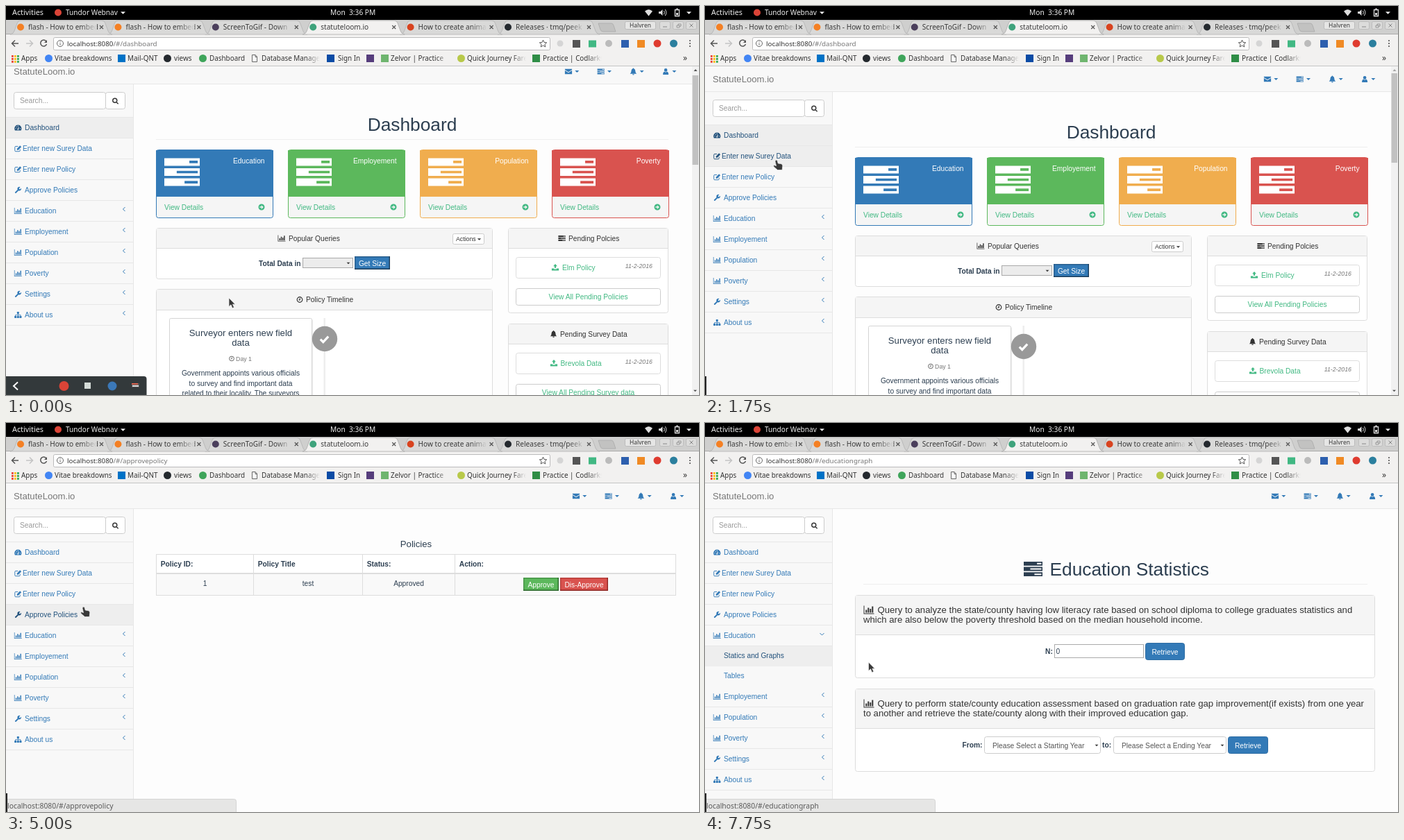
Recreate the animation shown at these times as an HTML page. Size 998 by 561 pixels, loop 8000 ms.

```html
<!DOCTYPE html>
<html lang="en">
<head>
<meta charset="utf-8">
<title>Dashboard walkthrough</title>
<style>
html, body { margin: 0; width: 100%; height: 100%; overflow: hidden; background: #fdfdfd; }
svg { display: block; width: 100%; height: 100%; font-family: "Liberation Sans", Arial, sans-serif; }
.ui { font-family: "Noto Sans", "Open Sans", sans-serif; }
</style>
</head>
<body>
<svg id="stage" viewBox="0 0 998 561"></svg>
<script>
const INK = '#2c3e50', BLUE = '#337ab7', GREEN = '#42b983', LINE = '#ddd', SIZE = 10.22, HEAD = 13.15, SMALL = 8.77;
const BOLD = 'font-weight="bold"', UI = 'class="ui"';

// Icons on a 14 x 14 grid: filled outline, optional stroked part and its width
const icons = {
  gauge: ['M0 8.500a7 7 0 0 1 14 0q0 2-1 4H1q-1-2-1-4zM6 9.500a1.200 1.200 0 1 0 2 0L9 5.500H8zM2 8h1.500v1.500H2zM3.500 4.500H5V6H3.500zM6.300 3h1.400v1.500H6.300zM10.500 8H12v1.500h-1.500z'],
  edit: ['M5 10V7.300L11 1.200l2.600 2.600L7.500 10z', 'M11 8.500v2.700a1.600 1.600 0 0 1-1.600 1.600H2.400a1.600 1.600 0 0 1-1.600-1.600V4.400a1.600 1.600 0 0 1 1.600-1.600H7', 1.3],
  wrench: ['M.8 11.300L6 6.200A4 4 0 0 1 11.500 1L9.300 3.200v1.600l1.700.6 2.400-2A4 4 0 0 1 8 8.100L2.900 13.200q-1.400.5-2.100-1.900z'],
  chart: ['M-.5 1h1v11h14v1h-15zM2.300 7h2v4h-2zM5.300 4h2v7h-2zM8.300 5.500h2V11h-2zM11.300 2h2v9h-2z'],
  sitemap: ['M5 1h4v4H7.600v1.500h4.900V9H14v4h-4V9h1.300V7.700H7.600V9H9v4H5V9h1.400V7.700H2.700V9H4v4H0V9h1.500V6.500h4.900V5H5z'],
  mail: ['M0 2h14v1.500L7 8 0 3.500zM0 5l7 4.500L14 5v7H0z'],
  tasks: ['M0 1.500h14v3H0zM0 5.500h14v3H0zM0 9.500h14v3H0zM9.900 2.500h3.300v1H9.900zM4.900 6.500h8.300v1H4.900zM8 10.500h5.200v1H8z'],
  bell: ['M7 0q1 0 1 1.200Q11 2 11 6q0 4 2.500 5.500H.5Q3 10 3 6q0-4 3-4.800Q6 0 7 0zM5.200 12h3.600a1.800 1.800 0 0 1-3.600 0z'],
  user: ['M7 1a3.200 3.200 0 0 1 0 6.400A3.200 3.200 0 0 1 7 1zM1.500 13q0-5.500 3-5.800 2.500 2 5 0 3 .3 3 5.800z'],
  clock: ['', 'M7 1.800a5.200 5.200 0 1 1 0 10.400A5.200 5.200 0 1 1 7 1.800zM7.300 4v3.500H5', 1.6],
  check: ['', 'M2 7.500l3.500 3.500L12 4', 2.8],
  card: ['M0 4.500h14V7H0zM2 9.500h2v1H2zM5 9.500h3v1H5z', 'M.6 2h12.800v10H.6z', 1.1],
  upload: ['M7 0l4 4.500H8.500V8h-3V4.500H3zM0 9h4.500v1.500h5V9H14v4H0z'],
  go: ['M7 1a6 6 0 1 1 0 12A6 6 0 1 1 7 1zM3.500 6v2h4L6 9.500l1 1L10.700 7 7 3.500l-1 1L7.500 6z'],
  search: ['', 'M6 1.800a4 4 0 1 1 0 8.400a4 4 0 1 1 0-8.400zM9.300 9.300l3.500 3.500', 2],
};

const path = (d, fill = 'none', stroke = 'none', w = 1, extra = '') =>
  `<path d="${d}" fill="${fill}" stroke="${stroke}" stroke-width="${w}" ${extra}/>`;
function rect(x0, y0, x1, y1, fill, stroke, r = 0) {
  const i = stroke ? .5 : 0;
  return `<rect x="${x0 + i}" y="${y0 + i}" width="${x1 - x0 - 2 * i}" height="${y1 - y0 - 2 * i}" rx="${r}" fill="${fill}" stroke="${stroke || 'none'}"/>`;
}
const text = (x, y, s, size = SIZE, fill = INK, anchor = 'start', extra = '') =>
  `<text x="${x}" y="${y}" font-size="${size}" fill="${fill}" text-anchor="${anchor}" ${extra}>${s}</text>`;
const mid = (x, y, s, size, fill, extra) => text(x, y, s, size, fill, 'middle', extra);
const lines = (x, y, step, rows, size) => rows.map((s, i) => mid(x, y + i * step, s, size)).join('');
const ui = (x, y, s, size = 9.9, fill = '#333') => text(x, y, s, size, fill, 'start', UI);
const dot = (x, y, r, fill) => `<circle cx="${x}" cy="${y}" r="${r}" fill="${fill}"/>`;
const caret = (x, y, w = 3, fill = BLUE) => path(`M${x - w} ${y - w / 2}h${2 * w}l${-w} ${w}z`, fill);
const fade = (x0, y0, x1, y1, shade) => rect(x0, y0, x1, y1, `url(#${shade})`);
const rule = (x0, x1, y, color = '#eee') => rect(x0, y, x1, y + 1, color);
function icon(name, x, y, size = SIZE, color = BLUE) {
  const [solid, stroke, w] = icons[name];
  return `<g transform="translate(${x - size / 2} ${y - size / 2}) scale(${size / 14})">` +
    path(solid, color, 'none', 1, 'fill-rule="evenodd"') + (stroke ? path(stroke, 'none', color, w) : '') + '</g>';
}
const panel = (x0, y0, x1, y1, head) => rect(x0, y0, x1, y1, '#fff', LINE, 3) +
  rect(x0 + 1, y0 + 1, x1 - 1, head, '#f5f5f5') + rule(x0, x1, head - 1, LINE);
const field = (x0, y0, x1, y1, value = '') => rect(x0, y0, x1, y1, '#fff', '#ccc', 3) + text(x0 + 9, y1 - 8, value, SIZE, '#555');
const button = (x0, y0, x1, y1, s, fill = BLUE, edge = '#2e6da4') =>
  rect(x0, y0, x1, y1, fill, edge, 3) + mid((x0 + x1) / 2, y1 - 8.500, s, SIZE, '#fff');
const bevel = (x0, y0, x1, y1, s, fill, dark) => rect(x0, y0, x1, y1, fill) +
  path(`M${x0 + .7} ${y1}V${y0 + .7}H${x1}`, 'none', dark, 1.4, 'opacity=".45"') +
  path(`M${x0} ${y1 - .7}H${x1 - .7}V${y0}`, 'none', dark, 1.4) + mid((x0 + x1) / 2, y1 - 5.300, s, SIZE, '#fff');
const title = (x, y, s) => mid(x, y, s, 26.3);

const tabs = [['flash - How to embed', '#f48024'], ['flash - How to embed', '#f48024'], ['ScreenToGif - Down', '#4b3f5c'],
  ['statuteloom.io', '#3fa37c'], ['How to create anima', '#d8431f'], ['Releases · tmq/peek', '#24292e']];
const bookmarks = [[56, 70, 'Vitae breakdowns', '#4285f4'], [161, 175, 'Mail-QNT', '#0072c6', 1], [227, 242, 'views', '#24292e'],
  [278, 293, 'Dashboard', '#3fa55b'], [353, 368, 'Database Manage', '', 0, 452], [462, 478, 'Sign In', '#0a4ba5', 1], [519, 535, '', '#563d7c', 1],
  [540, 554, 'Zelvor | Practice', '#6fb56f', 1, 639], [650, 664, 'Quick Journey Fares', '#b8c94a', 0, 749],
  [758, 773, 'Practice | Codlarks', '#2f8d46', 1, 858]];

function tab(i) {
  const x = 6 + 140.4 * i, on = i === 3, [label, color] = tabs[i];
  return path(`M${x} 41q5-1 6-5l4-11q1-4 5-4h117q4 0 5 4l4 11q1 4 6 5z`, on ? '#f2f1f0' : '#d9d9d8', on ? '#aaa' : '#b3b3b3', .8) +
    dot(x + 15, 30.5, 5, color) + ui(x + 26, 34, label, 10.1, '#3a3a3a') +
    fade(x + 102, 24, x + 125, 38, on ? 'fadeOn' : 'fadeOff') + path(`M${x + 129} 28l5 5m0-5l-5 5`, 'none', '#555', 1.2);
}

function browser(url) {
  const cut = url.indexOf('/');
  let out = rect(0, 0, 998, 20, '#000') + text(9, 13, 'Activities', 10.8, '#eee', 'start', UI) + dot(75, 9.500, 5, '#db4437') +
    ui(86, 13, 'Tundor Webnav', 10.1, '#eee') + caret(168.500, 10, 3.500, '#eee') + ui(467, 13, 'Mon\u00a0\u00a03:36 PM', 10.2, '#eee') +
    path('M920 7.500q5.500-5 11 0l-5.500 7z', '#ddd') +
    path('M940 8h2.500l3-3v9l-3-3H940z', '#ddd') + path('M947.500 7q2 2.500 0 5m1.700-7q3.500 4.500 0 9', 'none', '#ddd') +
    path('M963.500 5.500h6v9h-6zM965.500 4h2', 'none', '#ddd', 1.3) + rect(965, 10, 968, 13, '#ddd') + caret(983.500, 10, 3.500, '#eee');
  out += rect(0, 20, 998, 41, '#cfcfce') + rect(0, 41, 998, 87, '#f2f1f0') + rule(0, 998, 40, '#aaa');
  for (const i of [5, 4, 2, 1, 0, 3]) out += tab(i);
  out += path('M853 25h19q2 0 3 3l3 9h-18q-3 0-4-3z', '#c2c2c1', '#aaa', .8) +
    rect(891, 22, 936, 34, '#e6e6e5', '#bbb', 2) + mid(913.500, 31, 'Halvren', 8.5, '#333', UI);
  for (const x of [941, 960, 979]) out += rect(x, 22, x + 16, 34, '#dcdcdb', '#bdbdbd', 2);
  out += path('M946 30h6', 'none', '#888') + path('M966 28h4v3h-4zM968 28v-2h4v3h-2', 'none', '#888', .8) + path('M984.500 25.500l5 5m0-5l-5 5', 'none', '#888');
  out += path('M18 54H9m4-4.500L8.500 54l4.500 4.500', 'none', '#555', 1.5) + path('M29 54h9m-4-4.500l4.500 4.500-4.500 4.500', 'none', '#c4c4c4', 1.5) +
    path('M58 51a4.500 4.500 0 1 0 .5 4', 'none', '#555', 1.5) + path('M59 49v4h-4z', '#555') + rect(68, 45, 784, 64, '#fff', '#bbb', 2) +
    path('M78 49.500a4.500 4.500 0 1 1 0 9a4.500 4.500 0 1 1 0-9M78 53.500v3M78 51v1.200', 'none', '#666') +
    ui(88, 58, `${url.slice(0, cut)}<tspan fill="#777">${url.slice(cut)}</tspan>`, 9.8) +
    path('M773.500 49l1.500 3.500 3.700.3-2.800 2.500.9 3.700-3.300-2-3.300 2 .9-3.700-2.800-2.500 3.700-.3z', 'none', '#555');
  out += dot(798, 54, 4.500, '#d5d5d5') + rect(816, 49, 827, 60, '#555') + rect(839, 49.500, 850, 59.500, '#41b883') + dot(868, 54, 5, '#bbb') +
    rect(886, 49, 897, 60, '#2d5fae') + rect(909, 49, 920, 60, '#f08a24') + dot(938, 54, 5.500, '#df3b2f') + dot(961.500, 54, 5.500, '#2b7f9e');
  for (const y of [50, 54, 58]) out += dot(985, y, 1.1, '#555');
  const hues = ['#ea4335', '#fbbc05', '#34a853', '#4285f4'];
  for (let i = 0; i < 9; i++) {
    const x = 8 + i % 3 * 4, row = i / 3 | 0, y = 71 + row * 4;
    out += rect(x, y, x + 2.8, y + 2.8, hues[(i + row) % 4]);
  }
  out += ui(22, 79, 'Apps');
  for (const [ix, x, label, color, square, end] of bookmarks) {
    out += !color ? path(`M${ix + 1.500} 70.500h4.500l2.500 2.500v7.500h-7zM${ix + 6} 70.500v3h2.500`, '#fff', '#666')
      : square ? rect(ix, 70, ix + 11, 81, color) : dot(ix + 5.500, 75.500, 5.500, color);
    out += ui(x, 79, label) + (end ? fade(end - 20, 68, end, 84, 'fadeOn') + rect(end, 68, end + 10, 84, '#f2f1f0') : '');
  }
  return out + ui(975, 79, '»', 12) + rule(0, 998, 86, '#c4c4c4');
}

const menu = [['gauge', 'Dashboard'], ['edit', 'Enter new Surey Data'], ['edit', 'Enter new Policy'], ['wrench', 'Approve Policies'],
  ['chart', 'Education'], ['chart', 'Employement'], ['chart', 'Population'], ['chart', 'Poverty'], ['wrench', 'Settings'], ['sitemap', 'About us']];

function sidebar({ hot, open }) {
  const tone = i => hot.includes(i) ? '#23527c' : BLUE, back = i => hot.includes(i) ? '#eee' : '#f8f8f8';
  let out = rect(0, 124, 183, 1800, '#f8f8f8') + rect(183, 124, 184, 1800, '#e7e7e7') +
    rect(11, 135, 144, 160, '#fff', '#ccc', 3) + rect(143, 135, 172, 160, '#fff', '#ccc', 3) +
    text(20, 151, 'Search...', SIZE, '#999') + icon('search', 157.500, 148, 10, '#333') + rule(0, 183, 171, '#e7e7e7');
  menu.forEach(([name, label], i) => {
    const y = 172 + 30 * i + (i > 4 ? open : 0);
    out += rect(0, y, 183, y + 29, back(i)) + rule(0, 183, y + 29, '#e7e7e7') +
      icon(name, 17.300, y + 14.500, SIZE, tone(i)) + text(name === 'edit' ? 24 : 27, y + 18, label, SIZE, tone(i));
    if (i > 3) out += path(i === 4 && open ? `M165.500 ${y + 11}l3 3 3-3` : `M171.500 ${y + 9}l-3 3 3 3`, 'none', tone(i));
    if (i === 4 && open) ['Statics and Graphs', 'Tables'].forEach((s, k) => {
      const sy = y + 30 + 29 * k;
      out += rect(0, sy, 183, sy + 29, back(10 + k)) + text(27, sy + 17, s, SIZE, tone(10 + k));
    });
  });
  return out;
}

function navbar(dx) {
  let out = rect(0, 87, 998, 124, '#f8f8f8') + rule(0, 998, 123, '#e7e7e7') + text(11, 109.500, 'StatuteLoom.io', HEAD, '#777');
  ['mail', 'tasks', 'bell', 'user'].forEach((name, i) => {
    const x = 810 + dx + 46.700 * i;
    out += icon(name, x, 105.500) + caret(x + 12.300, 105.500);
  });
  return out;
}

function timelineCard(x0, y0, y1, badge, color, heads, day, paras) {
  const cx = x0 + 103;
  let out = rect(x0 + 1, y0 + 2, x0 + 207, y1 + 2, '#eee', '', 2) + rect(x0, y0, x0 + 206, y1, '#fff', '#d4d4d4', 2) +
    dot(459, y0 + 30, 18.200, color) + icon(badge, 458.500, y0 + 30, 16, '#fff') + lines(cx, y0 + 26, 14.200, heads, HEAD) +
    icon('clock', cx - (day.length > 5 ? 16.500 : 13), y0 + 58.500, 9, '#777') + mid(cx + 4.500, y0 + 61.700, day, SMALL, '#777');
  let y = y0 + 82.9;
  for (const p of paras) {
    out += lines(cx, y, 14.600, p);
    y += p.length * 14.600 + 4;
  }
  return out;
}

function pending(y, name, head, hx, item, all) {
  return panel(723, y, 954, y + 123, y + 30) + icon(name, hx - 9.500, y + 15, SIZE, '#333') + text(hx, y + 19, head, SIZE, '#333') +
    rect(734, y + 42, 943, y + 73, '#fff', LINE, 3) + icon('upload', 791 - (hx < 800 ? 2 : 0), y + 57, SIZE, GREEN) +
    text(hx < 800 ? 798.500 : 801, y + 60.700, item, SIZE, GREEN) + text(931, y + 58, '11-2-2016', SMALL, '#777', 'end', 'font-style="italic"') +
    rect(734, y + 87, 943, y + 112, '#fff', '#ccc', 3) + mid(838.500, y + 103, all, SIZE, GREEN);
}

function dashboard() {
  let out = title(585, 191, 'Dashboard') + rule(216, 954, 203);
  [['Education', BLUE], ['Employement', '#5cb85c'], ['Population', '#f0ad4e'], ['Poverty', '#d9534f']].forEach(([s, color], i) => {
    const x = 216 + 190 * i;
    out += rect(x, 218, x + 169, 317, '#f5f5f5', color, 3) + rect(x, 219, x + 169, 286, color) + icon('tasks', x + 37.500, 250.500, 51, '#fff') +
      text(x + 156.500, 237.500, s, SIZE, '#fff', 'end') + text(x + 12, 304.700, 'View Details', SIZE, GREEN) + icon('go', x + 152, 301, 10.5, GREEN);
  });
  out += panel(216, 331, 701, 405, 361) + icon('chart', 397, 346, SIZE, '#333') + text(407, 350, 'Popular Queries', SIZE, '#333') +
    rect(643, 339, 689, 355, '#fff', '#ccc', 2) + text(648, 350, 'Actions', SMALL, '#333') + caret(681.500, 347.500, 2.7, '#333') +
    text(364, 385.700, 'Total Data in', SIZE, INK, 'start', BOLD) + rect(427, 374, 500, 389, '#ececec', '#a9a9a9') + caret(493, 382, 2.4, '#333') +
    bevel(502, 372, 553, 391, 'Get Size', BLUE, '#1d3d5a');
  out += panel(216, 419, 701, 1500, 450) + icon('clock', 423, 434.5, SIZE, '#333') + text(432, 438.2, 'Policy Timeline', SIZE, '#333') +
    rect(457.500, 461, 460, 1480, '#eee');
  out += timelineCard(235, 461, 636, 'check', '#999', ['Surveyor enters new field', 'data'], 'Day 1',
    [['Government appoints various officials', 'to survey and find important data', 'related to their locality. The surveyors',
      'enter this collected data after', 'verification of authentication from a', 'superior authority into the system.']]);
  out += timelineCard(476, 640, 840, 'card', '#f0ad4e', ['Government Supervisor', 'approves the data'], 'Day 5-7',
    [['There is hierarchial structure of', 'supervisors who have specific domain', 'knowledge.'],
      ['They check the authenticity of the', 'entered data for various', 'parameters and approve it.']]);
  return out + pending(331, 'tasks', 'Pending Polcies', 810, 'Elm Policy', 'View All Pending Policies') +
    pending(469, 'bell', 'Pending Survey Data', 798, 'Brevola Data', 'View All Pending Survey data');
}

function formTop(cx, right, heading, bottom) {
  const label = (x, s) => mid(x, 325, s, SIZE, INK, BOLD);
  return title(cx, 220, heading) + rule(216, right, 232) + panel(216, 248, right, bottom, 264) +
    button(cx - 5.500, 275, cx + 45.500, 300, 'County') + button(cx - 48, 275, cx - 5, 300, 'State', '#286090', '#204d74') +
    label((228 + cx) / 2, 'State:') + label((cx + right - 12) / 2, 'County:') +
    field(239, 332, cx - 10.500, 357) + field(cx + 11, 332, right - 22, 357);
}

function survey() {
  return formTop(590.5, 965, 'New Survey Data', 450) + mid(590.5, 379, 'Select a CSV File to upload', SIZE, INK, BOLD) +
    rect(228, 386, 295, 403, '#e6e6e6', '#a5a5a5', 1) + text(234, 398.300, 'Choose File', SIZE, '#000') + text(297.500, 398.300, 'No file chosen') +
    button(565, 402, 616, 427, 'Submit');
}

function policy() {
  let out = formTop(585, 954, 'New Policy Submission Form', 1000);
  [['Domain *', ''], ['Policy Duration (Approx Duration in Months) *', '0'], ['Policy Budget(in $) *', '0'], ['Policy Name: *', '']].forEach(([s, value], i) => {
    const y = 379 + 54 * i;
    out += mid(585, y, s, SIZE, INK, BOLD) + field(228, y + 7, 943, y + 32, value);
  });
  return out + caret(936, 399, 2.4, '#333');
}

function approve() {
  const edges = [216, 356, 513, 646, 965];
  let out = mid(590.5, 179, 'Policies', HEAD) + rect(216, 189, 965, 249, '#fff', LINE) + rect(217, 217, 964, 248, '#f9f9f9') + rect(216, 216, 965, 218, LINE);
  ['Policy ID:', 'Policy Title', 'Status:', 'Action:'].forEach((s, i) => {
    out += rect(edges[i], 189, edges[i] + 1, 249, LINE) + text(edges[i] + 6.800, 206.700, s, SIZE, INK, 'start', BOLD);
  });
  ['1', 'test', 'Approved'].forEach((s, i) => out += mid((edges[i] + edges[i + 1]) / 2 + .5, 234.700, s));
  return out + bevel(745, 223, 796, 242, 'Approve', '#5cb85c', '#2c682c') + bevel(798, 223, 867, 242, 'Dis-Approve', '#d9534f', '#8f2522');
}

function education() {
  const bold = (x, y, s) => text(x, y, s, SIZE, INK, 'start', BOLD);
  const select = (x0, x1, s) => field(x0, 452, x1, 477) + text(x0 + 12, 468.500, s, SIZE, '#555') + caret(x1 - 6, 465, 2.4, '#333');
  const query = (y, a, b) => panel(216, y, 965, y + 120, y + 58) + icon('chart', 236, y + 21.500, 14, '#333') +
    text(248.500, y + 26, a, HEAD, '#333') + text(228, y + 40, b, HEAD, '#333');
  return icon('tasks', 472.500, 210.500, 27, INK) + text(496.500, 220, 'Education Statistics', 26.3) + rule(228, 954, 232) +
    query(248, 'Query to analyze the state/county having low literacy rate based on school diploma to college graduates statistics and',
      'which are also below the poverty threshold based on the median household income.') +
    bold(490, 332.500, 'N:') + rect(503, 319, 632, 339, '#fff', '#aaa') + text(505.500, 332.500, '0') + button(634, 317, 691, 342, 'Retrieve') +
    query(383, 'Query to perform state/county education assessment based on graduation rate gap improvement(if exists) from one year',
      'to another and retrieve the state/county along with their improved education gap.') +
    bold(370.500, 467.500, 'From:') + select(402, 570, 'Please Select a Starting Year') + bold(572, 467.500, 'to:') +
    select(588, 751, 'Please Select a Ending Year') + button(753, 452, 811, 477, 'Retrieve');
}

// Each page: drawing, address and, where it overflows, its full height
const pages = {
  dashboard: [dashboard, 'dashboard', 1668], survey: [survey, 'newsurveydata'], policy: [policy, 'policy/new/', 1121],
  approve: [approve, 'approvepolicy'], education: [education, 'educationgraph'],
};
const HOST = 'localhost:8080/#';

function scrollbar(height, scroll) {
  const top = 97 + 454 * scroll / height;
  return rect(988, 87, 998, 561, '#f1f1f1') + rect(988.5, top, 997, top + 454 * 474 / height, '#c1c1c1') +
    path('M990.500 94l2.500-3 2.500 3z', scroll ? '#505050' : '#a3a3a3') + caret(992.500, 555, 2.5, '#505050');
}
const statusBar = s => rect(-4, 542, 332, 565, '#e6e6e5', '#d4d4d4', 3) + ui(2, 556, s, 10.35, '#5a5a5a');
const dock = () => rect(-4, 534, 202.500, 566, '#33393b', '', 4) + path('M17 542.500l-6 5.500 6 5.500', 'none', '#fff', 2) +
  dot(83.500, 548, 7, '#db4437') + rect(113, 543, 122, 552, '#d5dcd8') + dot(153, 548, 6.500, '#3b78b8') +
  rect(181, 544, 192, 550, '#555') + rect(181, 544, 190, 546, '#d9634f') + rect(182, 547, 191, 549, '#ddd');
const pointer = ([kind, x, y]) => path(kind === 'hand'
  ? 'M4 .3q1.600-.7 2.200 1l1.100 3.700 4 .5q2.500.5 2.500 3l-.7 6H6.500L1 9.800Q0 8 1.700 7.600l2.800.9L3 2.300Q2.900.8 4 .3z'
  : 'M0 0V12.500L3 9.800 5 14.700 7.400 13.600 5.400 9.200H9z', '#3a3a3a', '#f4f4f4', .7, `transform="translate(${x} ${y})"`);

const steps = [
  [0, { page: 'dashboard', scroll: 11, hot: [0], open: 0, dock: true, status: null, cursor: ['arrow', 321, 421] }],
  [250, { scroll: 115 }], [500, { scroll: 219 }], [750, { scroll: 240 }], [1000, { scroll: 120 }], [1250, { scroll: 0 }],
  [1500, { dock: false, cursor: ['arrow', 213, 322] }],
  [1750, { hot: [0, 1], cursor: ['hand', 98, 222] }],
  [2000, { status: '/newsurveydata' }],
  [2250, { page: 'survey', hot: [1] }],
  [2750, { cursor: ['arrow', 105.5, 231] }],
  [3000, { hot: [1, 2], status: '/policy/new/', cursor: ['hand', 101, 254] }],
  [3500, { page: 'policy', hot: [2] }],
  [4000, { cursor: ['arrow', 110, 259] }],
  [4250, { hot: [2, 3], status: '/approvepolicy', cursor: ['hand', 107, 265] }],
  [4750, { page: 'approve', hot: [3] }],
  [5750, { cursor: ['hand', 108, 275] }],
  [6000, { hot: [3, 4], status: '', cursor: ['hand', 109, 290] }],
  [6250, { cursor: ['hand', 109, 296] }],
  [6500, { open: 30 }], [6750, { open: 58 }],
  [7000, { hot: [3, 4, 10], status: '/educationgraph', cursor: ['hand', 111, 328] }],
  [7250, { page: 'education', hot: [10] }],
  [7500, { cursor: ['arrow', 165, 338] }],
  [7750, { cursor: ['arrow', 235.5, 345] }],
];

const gradient = (id, color) => `<linearGradient id="${id}"><stop stop-color="${color}" stop-opacity="0"/><stop offset="1" stop-color="${color}"/></linearGradient>`;
const defs = `<defs>${gradient('fadeOn', '#f2f1f0')}${gradient('fadeOff', '#d9d9d8')}</defs>`;

function draw(s) {
  const [body, address, height] = pages[s.page];
  return defs + rect(0, 87, 998, 561, '#fdfdfd') +
    `<g transform="translate(0 ${-s.scroll})">${sidebar(s)}${navbar(height ? 0 : 11)}${body()}</g>` +
    (height ? scrollbar(height, s.scroll) : '') + browser(`${HOST}/${address}`) +
    (s.status === null ? '' : statusBar(HOST + s.status)) + (s.dock ? dock() : rect(0, 534, 2, 561, '#222')) + pointer(s.cursor);
}

const stage = document.getElementById('stage');
let shown = 0;
function tick() {
  const t = performance.now() % 8000;
  const past = steps.filter(([start]) => start <= t);
  if (past.length !== shown) {
    shown = past.length;
    stage.innerHTML = draw(Object.assign({}, ...past.map(([, change]) => change)));
  }
  requestAnimationFrame(tick);
}
tick();
</script>
</body>
</html>
```
